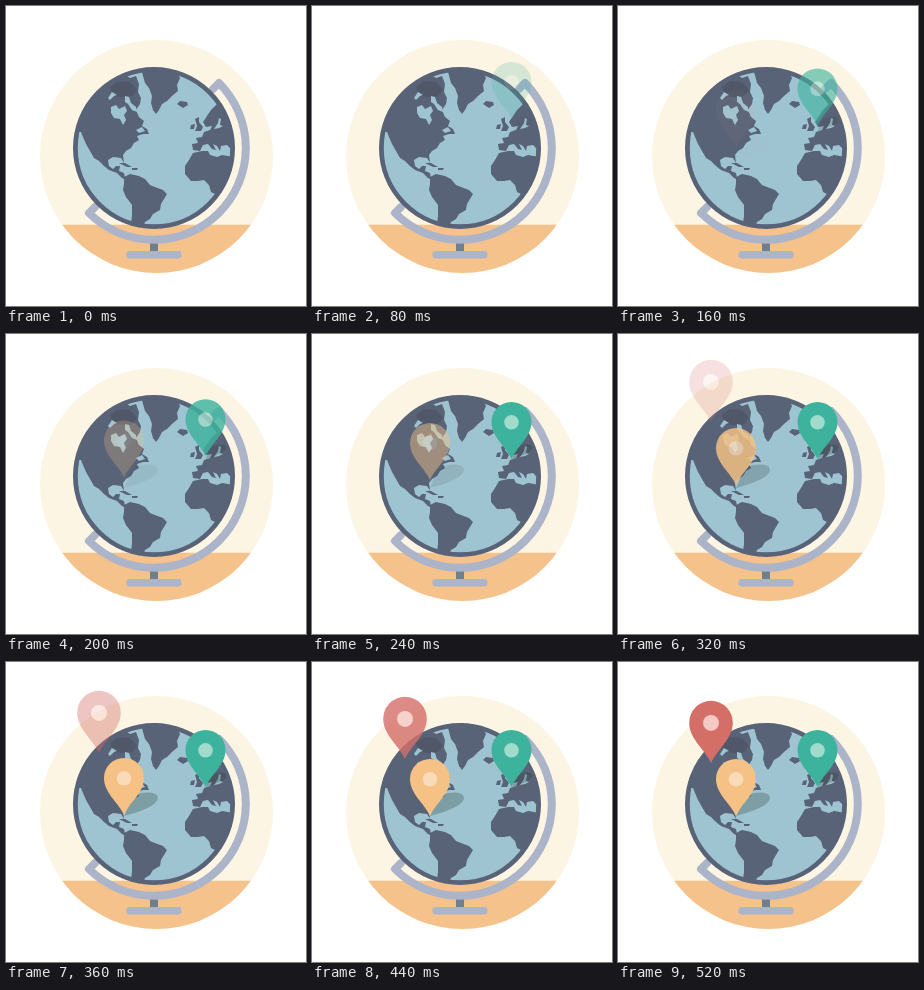
Animation of 300x300 px, one loop 2 s. Source, as an HTML page:

```html
<!DOCTYPE html>
<html lang="en">
<head>
<meta charset="utf-8">
<title>Globe with pins</title>
<style>
  html, body { margin: 0; width: 100%; height: 100%; overflow: hidden; background: #fff; }
  svg { display: block; width: 100vw; height: 100vh; }
</style>
</head>
<body>
<svg viewBox="0 0 300 300">
  <defs>
    <clipPath id="disc"><circle cx="150.5" cy="150.5" r="116.5"/></clipPath>
    <clipPath id="sea"><circle cx="148" cy="142" r="78"/></clipPath>
    <path id="drop" d="M0 0C-5-12-20-22-20-37A20 20 0 0 1 20-37C20-22 5-12 0 0Z"/>
    <path id="shade" d="M0 0C4-6 4-16 12-21C21-25 34-24 34-18C33-10 15-4 0 0Z"/>
  </defs>

  <g clip-path="url(#disc)">
    <path fill="#fcf5e3" d="M0 0H300V219H0Z"/>
    <path fill="#f5c28c" d="M0 218.7H300V300H0Z"/>
  </g>

  <!-- Stand -->
  <path fill="#6f7f8c" d="M144 236h8v11h-8z"/>
  <rect x="120.3" y="245" width="55.4" height="7.6" rx="3.8" fill="#abb4c9"/>
  <path d="M207 83L213 77A91.924 91.924 0 0 1 83 207L89 201" fill="none" stroke="#abb4c9"
        stroke-width="8" stroke-linecap="round" stroke-linejoin="round"/>

  <!-- Globe -->
  <circle cx="148" cy="142" r="79" fill="#9fc4d1"/>
  <g clip-path="url(#sea)" fill="#596378">
    <!-- North America -->
    <path d="M66 126L66 90L95 66L118 68L124 72L130 70L133 78L132 86L135 92L134 98L130 104L133 111L138 115
      L136 120L141 123L143 128L137 128L131 130L133 134L128 137L125 142L120 145L117 149L118 157L115 152L107 151
      L102 154L103 160L107 163L110 160L114 160L113 165L118 167L119 172L124 173L122 175L116 172L111 167L103 164
      L98 160L93 155L88 152L84 145L80 138L77 131L75 126Z"/>
    <!-- Caribbean islands -->
    <path d="M113 157L119 157L126 161L121 161ZM126 162L132 162L131 164L126 164Z"/>
    <!-- Greenland -->
    <path d="M136 66L143 58L168 60L174 72L171 79L172 85L166 90L161 95L156 98L153 104L150 108L147 104L145 97
      L146 90L143 82L139 77Z"/>
    <path d="M171 98L174 95L181 96L182 99L177 102Z"/>
    <!-- South America -->
    <path d="M118 171L124 168L133 170L139 173L144 179L149 181L157 184L161 188L158 193L155 198L154 204L147 208
      L144 213L139 216L136 224L124 224L126 210L126 199L120 191L117 184L118 178Z"/>
    <!-- Europe -->
    <path d="M234 94L234 141L224 142L221 139L215 140L214 145L211 140L207 138L210 144L206 143L202 138L197 139
      L194 145L187 144L186 138L192 137L190 132L196 131L198 126L204 124L206 120L200 121L197 116L201 110L205 104
      L211 98Z"/>
    <path d="M189 113L193 111L193 116L197 121L195 125L189 125L191 120ZM185 119L189 118L188 123L184 123Z"/>
    <!-- Africa -->
    <path d="M187 147L196 145L202 145L204 149L211 151L216 149L234 152L222 183L214 183L209 188L205 186L203 179
      L198 174L192 175L185 175L179 168L179 160L183 154Z"/>
  </g>
  <!-- Arctic islands -->
  <path fill="#49505f" opacity=".6" d="M104 81L112 75L124 76L131 84L126 90L116 91L107 90Z"/>
  <!-- Inland waters and straits -->
  <g fill="#9fc4d1">
    <path d="M105 101L110 99L113 103L119 100L121 105L118 109L120 114L117 119L114 113L108 112L105 107Z"/>
    <path d="M119 90L123 91L125 97L130 101L131 106L126 104L122 98L119 96Z"/>
    <path d="M106 86L111 89L108 90L104 94L102 92Z"/>
    <path d="M130 124L136 121L139 125L133 127Z"/>
    <path d="M208 123L212 117L213 112L215 113L214 119L217 120L213 122Z"/>
  </g>
  <circle cx="148" cy="142" r="78.6" fill="none" stroke="#596378" stroke-width="4.8"/>
  <g id="pins"></g>
</svg>
<script>
  const STEP = 40, LOOP = 2000;

  // Steps: [time in ms, lift above the resting place, opacity]
  const pins = [
    { x: 93, y: 101, size: 1.09, fill: '#d46f68', dot: '#f6c9c6', shade: 0,
      steps: [[280, 14, 0], [320, 13, .2], [360, 10, .4], [440, 4, .8], [520, 0, 1]] },
    { x: 199.5, y: 125, size: 1, fill: '#3db39e', dot: '#a0dbcb', shade: .62,
      steps: [[40, 14, 0], [80, 12, .2], [160, 5.5, .62], [240, 0, 1]] },
    { x: 118, y: 154, size: 1, fill: '#f5c184', dot: '#f9dbb9', shade: 1,
      steps: [[160, 13, .03], [240, 8, .45], [320, 3, .83], [360, 1, 1], [400, 0, 1]] }
  ];

  const layer = document.getElementById('pins');

  function add(parent, tag, attrs) {
    const node = document.createElementNS('http://www.w3.org/2000/svg', tag);
    for (const key in attrs) node.setAttribute(key, attrs[key]);
    return parent.appendChild(node);
  }

  for (const pin of pins) {
    pin.group = add(layer, 'g', {});
    if (pin.shade) {
      add(pin.group, 'use', { href: '#shade', fill: '#26382f', 'fill-opacity': .27,
        transform: `translate(${pin.x} ${pin.y}) scale(${pin.shade})` });
    }
    pin.body = add(pin.group, 'g', {});
    add(pin.body, 'use', { href: '#drop', fill: pin.fill });
    add(pin.body, 'circle', { cy: -36.7, r: 7.3, fill: pin.dot });
  }

  function pose(steps, t) {
    if (t < steps[0][0]) return [0, 0];
    const i = steps.findIndex(s => s[0] > t);
    if (i < 0) return steps[steps.length - 1].slice(1);
    const a = steps[i - 1], b = steps[i];
    const k = (t - a[0]) / (b[0] - a[0]);
    return [1, 2].map(n => a[n] + (b[n] - a[n]) * k);
  }

  function draw(now) {
    const t = Math.floor((now % LOOP) / STEP) * STEP;
    for (const pin of pins) {
      const [lift, alpha] = pose(pin.steps, t);
      pin.group.setAttribute('opacity', alpha);
      pin.body.setAttribute('transform', `translate(${pin.x} ${pin.y - lift}) scale(${pin.size})`);
    }
  }

  const start = performance.now();
  function tick() {
    draw(performance.now() - start);
    requestAnimationFrame(tick);
  }
  tick();
</script>
</body>
</html>
```
